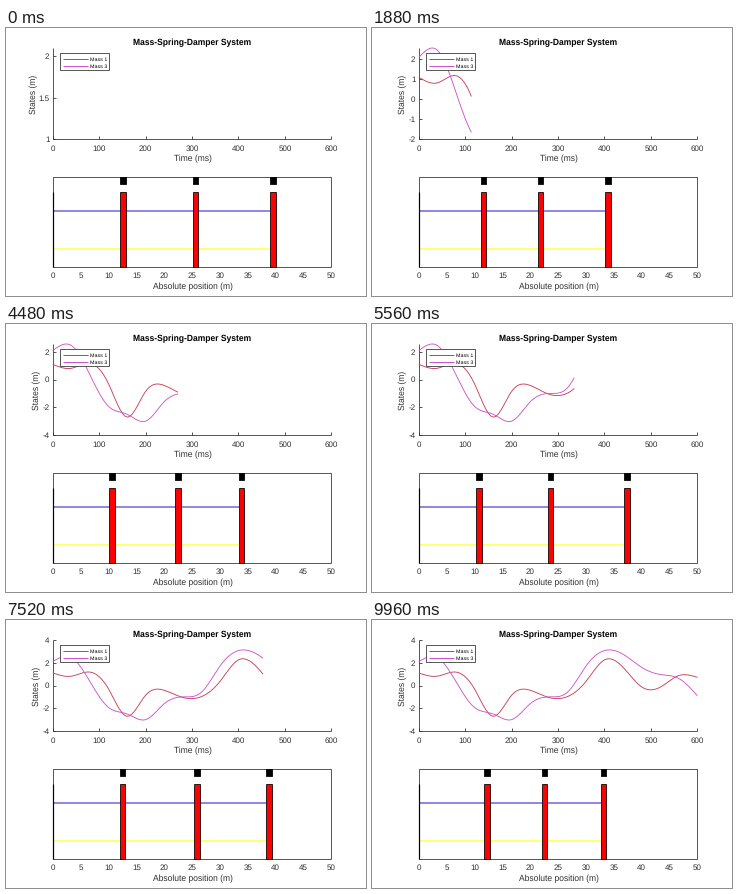
Recreate the animation shown at these times as a matplotlib script. Size 360 by 268 pixels, loop 10000 ms.

```python
import numpy as np
import matplotlib.pyplot as plt
from matplotlib.animation import FuncAnimation
from matplotlib.patches import Rectangle

W, H, DPI = 360, 268, 64
FRAMES, INTERVAL = 250, 40
PT = 72 / DPI  # points per pixel

LEFT, RIGHT = 46.8, 325.3
TOP, BOTTOM = 20, 111
BOX_TOP, BOX_BOTTOM = 149, 239
DARK = "#303030"
RED, MAGENTA = "#c84058", "#cc55cc"
BLUE, YELLOW = "#8c8ce6", "#ffff78"

plt.rcParams.update({"font.family": "Liberation Sans",
                     "text.hinting": "none"})


def spline(y, t, h):
    """Natural cubic spline through values spaced evenly by h."""
    y = np.array(y, float)
    n = len(y)
    a = 4 * np.eye(n) + np.eye(n, k=1) + np.eye(n, k=-1)
    a[0], a[-1] = np.eye(n)[[0, -1]]
    b = np.zeros(n)
    b[1:-1] = np.diff(y, 2)
    m = np.linalg.solve(a, b)
    k = np.minimum(t // h, n - 2).astype(int)
    v = t / h - k
    u = 1 - v
    return (m[k] * (u**3 - u) + m[k + 1] * (v**3 - v)
            + y[k] * u + y[k + 1] * v)


# Displacement of each mass, given every 40 time units
time = np.linspace(0, 600, FRAMES)
pos = [spline(keys, time, 40) for keys in (
    [1.1, .82, 1.18, -.3, -2.7, -.85, -.42, -1.05,
     -.98, .35, 2.25, 1.6, -.12, -.15, .87, .72],
    [2.1, 2.46, .35, -1.93, -2.5, -3, -1.6, -1,
     -.6, 1.7, 3.07, 2.75, 1.6, .97, .62, -.9],
    [4.05, 1.8, -.85, -1.6, -2.4, -3.5, -3.4, -.9,
     1.5, 1.95, 2.25, 3.1, 3.2, 1.95, -.3, -2.35])]
low = np.minimum.accumulate(np.minimum(pos[0], pos[1]))
high = np.maximum.accumulate(np.maximum(pos[0], pos[1]))

fig = plt.figure(figsize=(W / DPI, H / DPI), dpi=DPI, facecolor="white")
ax = fig.add_axes([0, 0, 1, 1])
ax.set_xlim(0, W)
ax.set_ylim(H, 0)
ax.axis("off")


def line(xs, ys, color=DARK, width=.8, z=2):
    return ax.plot(xs, ys, color=color, lw=width * PT, zorder=z,
                   solid_capstyle="butt")[0]


def label(x, y, s, size=8, **kw):
    kw = {"ha": "center", "va": "baseline", "color": DARK, "zorder": 8, **kw}
    return ax.text(x, y, s, fontsize=size * PT, **kw)


def box(x, y, w, h, face, edge="black", width=.8, z=4):
    return ax.add_patch(Rectangle((x, y), w, h, fc=face, ec=edge,
                                  lw=width * PT, zorder=z))


def time_x(t):
    return LEFT + t * (RIGHT - LEFT) / 600


def metre_x(p):
    return LEFT + p * (RIGHT - LEFT) / 50


# State plot
label(186, 17, "Mass-Spring-Damper System", 8.5, weight="bold", color="black")
line([LEFT, LEFT, RIGHT], [TOP, BOTTOM, BOTTOM])
for t in range(0, 601, 100):
    line([time_x(t)] * 2, [BOTTOM, BOTTOM - 3])
    label(time_x(t), 122.7, str(t))
label(186.5, 133.3, "Time (ms)", 8.5)
y_title = label(28, 66, "States (m)", 8.5, rotation=90, va="center")
tick_marks = [line([], []) for _ in range(7)]
tick_labels = [label(43.5, 0, "", ha="right") for _ in range(7)]
curves = [line([], [], color, .9, 3) for color in (RED, MAGENTA)]

# Legend
box(54, 25, 49, 17, "white", DARK, .8, 5)
for y, color, name in ((31, RED, "Mass 1"), (38, MAGENTA, "Mass 3")):
    line([57, 82], [y, y], color, 1, 6)
    label(84.5, y + 2, name, 5.4, ha="left", color="black")

# Mass view
box(LEFT, BOX_TOP, RIGHT - LEFT, BOX_BOTTOM - BOX_TOP, "none", DARK, .8, 3)
line([LEFT, LEFT], [163.5, BOX_BOTTOM], "black", 1.2, 4)
for p in range(0, 51, 5):
    label(metre_x(p), 250.4, str(p))
label(186.5, 261, "Absolute position (m)", 8.5)
links = [line([], [], color, 2, 2) for color in (BLUE, YELLOW)]
bar_w = metre_x(1) - LEFT
bars = [box(0, 163.5, bar_w, BOX_BOTTOM - 163.5, "red") for _ in range(3)]
blocks = [box(0, BOX_TOP, bar_w, 7, "black") for _ in range(3)]


def limits(n):
    bottom = next(v for v in (1, .5, 0, -1, -2, -4) if v <= low[n])
    top = high[n] if high[n] < 2.6 else 4
    step = .5 if bottom >= 0 else 1 if bottom >= -2 else 2
    return bottom, top, step


def draw(n):
    bottom, top, step = limits(n)

    def value_y(v):
        return BOTTOM - (v - bottom) * (BOTTOM - TOP) / (top - bottom)

    ticks = np.arange(bottom, top + 1e-6, step)
    for i, (mark, text) in enumerate(zip(tick_marks, tick_labels)):
        shown = i < len(ticks)
        mark.set_visible(shown)
        text.set_visible(shown)
        if shown:
            y = value_y(ticks[i])
            mark.set_data([LEFT, LEFT + 3], [y, y])
            text.set_position((43.5, y + 2.8))
            text.set_text(f"{ticks[i]:g}")
    y_title.set_x(28 if step < 1 else 31.3)

    for curve, p in zip(curves, pos):
        curve.set_data(time_x(time[:n + 1]), value_y(p[:n + 1]))

    for i in range(3):
        x = metre_x(11 + 12 * i + pos[i][n])
        bars[i].set_x(x)
        blocks[i].set_x(x)
    for link, y in zip(links, (182.5, 220.5)):
        link.set_data([LEFT, x], [y, y])
    return []


anim = FuncAnimation(fig, draw, frames=FRAMES, interval=INTERVAL,
                     repeat=True, repeat_delay=0, blit=False)
plt.show()
```
